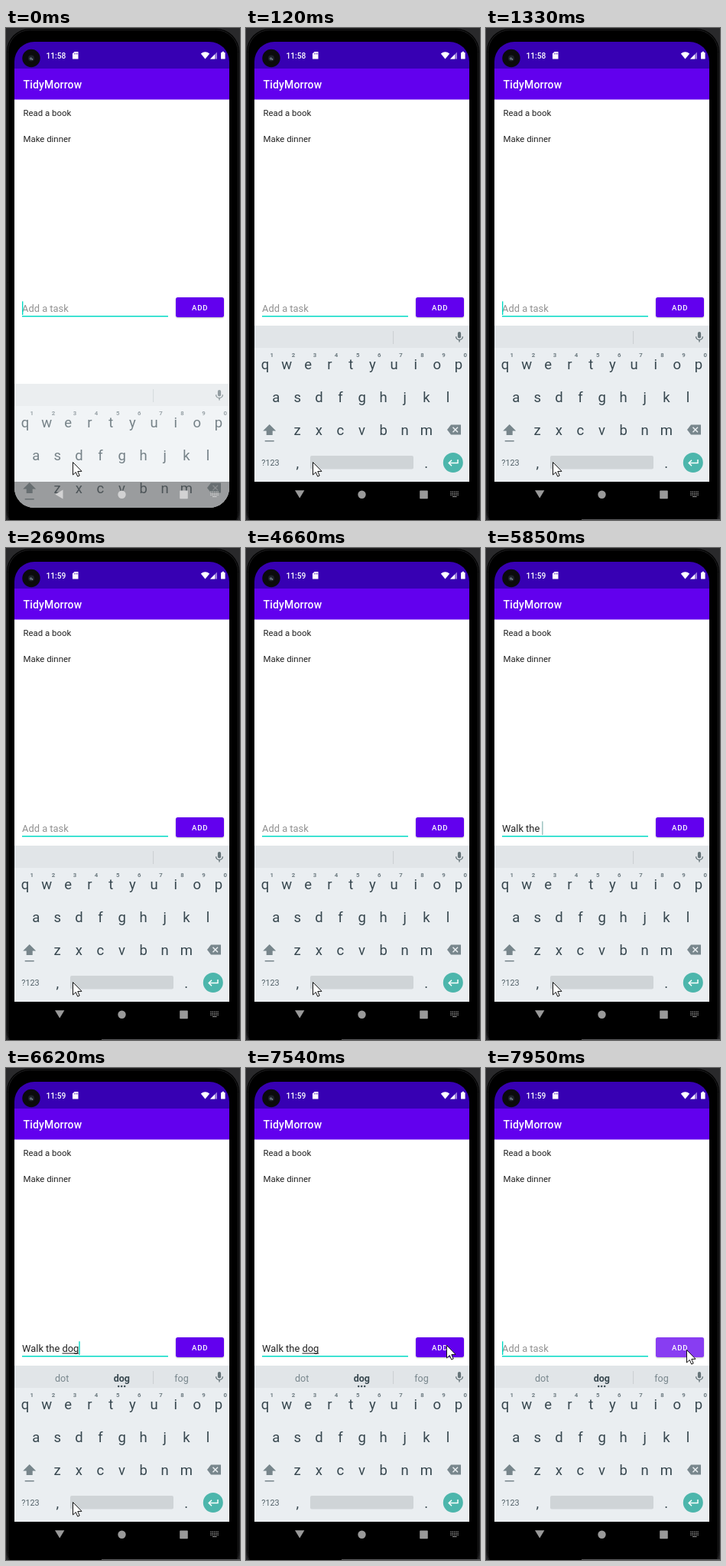
Animation of 306x643 px, one loop 8 s. Source, as an HTML page with a canvas:

```html
<!DOCTYPE html>
<html lang="en">
<head>
<meta charset="utf-8">
<title>Task list</title>
<style>
html, body { margin: 0; width: 100%; height: 100%; overflow: hidden; background: #000; }
canvas { display: block; width: 306px; height: 643px; }
</style>
</head>
<body>
<canvas id="stage"></canvas>
<script>
const W = 306, H = 643, LOOP = 8000;
const canvas = document.getElementById('stage');
const ctx = canvas.getContext('2d');
const ratio = window.devicePixelRatio || 1;
canvas.width = W * ratio;
canvas.height = H * ratio;

const PURPLE = '#6200ee', TEAL = '#03dac5', INK = '#37474f', SOFT = '#78868c';

// Each track is a list of [start, value]; the last started entry holds.
const caretTrack = [
  [0, 1], [120, 0], [400, 1], [650, 0], [1330, 1], [1640, 0], [2020, 1], [2690, 0],
  [3110, 1], [3610, 0], [4110, 1], [4660, 0], [4960, 1], [7180, 0], [7690, 1]
];
const textTrack = [
  [0, ''], [4960, 'W'], [5110, 'Wa'], [5230, 'Wal'], [5350, 'Walk'], [5470, 'Walk '],
  [5610, 'Walk t'], [5730, 'Walk th'], [5850, 'Walk the '], [6350, 'Walk the d'],
  [6500, 'Walk the do'], [6620, 'Walk the dog'], [7950, '']
];
const hintTrack = [
  [0, null], [5110, ['We', 'W', 'Was']], [5230, ['Was', 'Wa', 'Way']],
  [5350, ['Wall', 'Wal', 'Walls']], [5470, ['Wall', 'Walk', 'Walls']],
  [5730, ['to', 'th', 'the']], [5850, null], [6350, ['do', 'd', 'day']],
  [6500, ['dot', 'do', 'dog']], [6620, ['dot', 'dog', 'fog']]
];
const mouseTrack = [
  [0, [87, 567]], [7180, [98, 548]], [7300, [162, 454]], [7420, [236, 370]],
  [7540, [262, 362]], [7690, [262, 368]]
];

function at(track, t) {
  let value = track[0][1];
  for (const [start, v] of track) if (t >= start) value = v;
  return value;
}

function rect(x, y, w, h, color, r = 0) {
  ctx.fillStyle = color;
  ctx.beginPath();
  ctx.roundRect(x, y, w, h, r);
  ctx.fill();
}

function disc(x, y, r, color) {
  ctx.fillStyle = color;
  ctx.beginPath();
  ctx.arc(x, y, r, 0, 7);
  ctx.fill();
}

function path(color, points, width) {
  ctx.beginPath();
  for (let i = 0; i < points.length; i += 2) ctx.lineTo(points[i], points[i + 1]);
  if (width) {
    ctx.strokeStyle = color;
    ctx.lineWidth = width;
    ctx.stroke();
  } else {
    ctx.closePath();
    ctx.fillStyle = color;
    ctx.fill();
  }
}

function label(str, x, y, size, color, opt = {}) {
  ctx.font = `${opt.weight || 400} ${size}px Roboto, sans-serif`;
  ctx.letterSpacing = (opt.space || 0) + 'px';
  ctx.textAlign = opt.align || 'left';
  ctx.fillStyle = color;
  ctx.fillText(str, x, y);
  return ctx.measureText(str).width;
}

function phoneBody(t) {
  rect(0, 0, W, H, '#29292b');
  rect(1, 1, 304, 660, '#000', 30);
  ctx.strokeStyle = '#202022';
  ctx.lineWidth = 1;
  ctx.beginPath();
  ctx.roundRect(2.5, 2.5, 301, 660, 29);
  ctx.stroke();
  if (t >= 1330) rect(125, 642, 181, 1, '#5c5c5e');
}

function statusBar(t) {
  rect(11, 18, 281, 36, '#3700b3');
  disc(33, 39.5, 11.7, '#0b0b0d');
  disc(33, 39.5, 4, '#1d2229');
  disc(32.5, 40, 1.8, '#596570');
  disc(34.5, 41, 0.8, '#a0a9b1');
  label(t < 2140 ? '11:58' : '11:59', 52.5, 39.6, 10.2, '#fff', { weight: 500 });

  path('#fff', [89.5, 31, 94.5, 31, 94.5, 40.5, 87, 40.5, 87, 33.5]);
  for (const x of [89.2, 91, 92.8]) rect(x, 32.6, 0.7, 2, '#3700b3');

  ctx.fillStyle = '#fff';
  ctx.beginPath();
  ctx.moveTo(260.5, 40.5);
  ctx.lineTo(254.8, 33.5);
  ctx.quadraticCurveTo(260.5, 28.8, 266.2, 33.5);
  ctx.fill();
  path('#9b80d9', [267, 40.5, 276, 31.5, 276, 40.5]);
  path('#fff', [267, 40.5, 273, 34.5, 273, 40.5]);
  rect(281, 32, 5.6, 8.6, '#fff', 0.6);
  rect(282.6, 30.8, 2.4, 2, '#fff');
}

function button(t) {
  ctx.save();
  ctx.shadowColor = 'rgba(0,0,0,.25)';
  ctx.shadowBlur = 2 * ratio;
  ctx.shadowOffsetY = ratio;
  rect(222, 352, 63, 26, PURPLE, 2.7);
  ctx.restore();
  if (t >= 7690) {
    ctx.save();
    ctx.beginPath();
    ctx.roundRect(222, 352, 63, 26, 2.7);
    ctx.clip();
    disc(262, 367, t < 7810 ? 14 : t < 7950 ? 30 : 60, 'rgba(255,255,255,.24)');
    ctx.restore();
  }
  label('ADD', 242.9, 369, 9.6, '#fff', { weight: 500, space: 0.86 });
}

function field(t) {
  const text = at(textTrack, t);
  rect(21, 376, 191, 1.4, TEAL);
  let width = 0;
  if (text) {
    width = label(text, 21, 371, 12.9, '#212121');
    const composing = t >= 5110 && t < 5350 ? 0 : t >= 6350 ? 9 : -1;
    if (composing >= 0) {
      const from = ctx.measureText(text.slice(0, composing)).width;
      rect(21 + from, 372.6, width - from, 0.8, '#212121');
    }
  } else {
    label('Add a task', 21, 371, 12.9, '#919191');
  }
  if (at(caretTrack, t)) {
    const typing = text && t < 6620;
    rect(21 + width, 357.3, typing ? 0.9 : 1.4, 17.6, typing ? '#5d9c98' : TEAL);
  }
}

function mic(x, y) {
  const tone = '#667479';
  rect(x - 2.1, y - 7, 4.2, 8.6, tone, 2.1);
  ctx.strokeStyle = tone;
  ctx.lineWidth = 1.4;
  ctx.beginPath();
  ctx.arc(x, y - 0.8, 4.4, 0, Math.PI);
  ctx.stroke();
  rect(x - 0.7, y + 3.4, 1.4, 3.2, tone);
}

function letterRow(letters, x, y) {
  [...letters].forEach((c, i) =>
    label(c, x + i * 28.1, y, 18.5, INK, { align: 'center' }));
}

function keyboard(t) {
  rect(11, 389, 281, 29, '#e1e5e8');
  rect(11, 418, 281, 176, '#eaeef1');
  rect(192.2, 396, 0.9, 17, '#c6cbce');
  mic(279, 404);

  const hints = at(hintTrack, t);
  if (hints) {
    hints.forEach((word, i) => {
      const strong = i === 1;
      const bold = strong && ['Walk', 'dog'].includes(word);
      label(word, 73.2 + i * 78.1, 409.6, 12.5, strong ? INK : SOFT,
        { align: 'center', weight: bold ? 700 : 400 });
    });
    for (let i = -1; i < 2; i++) disc(151.2 + i * 4, 416, 1.2, INK);
  }

  for (let i = 0; i < 10; i++) {
    label(String((i + 1) % 10), 33.8 + i * 28.1, 430.3, 7.8, '#6c7a80',
      { align: 'center', weight: 700 });
  }
  letterRow('qwertyuiop', 25, 446);
  letterRow('asdfghjkl', 39.2, 488.8);
  letterRow('zxcvbnm', 67.2, 531.8);

  path(SOFT, [30.7, 518, 39.2, 526.5, 34.7, 526.5, 34.7, 532, 26.7, 532, 26.7, 526.5, 22.2, 526.5]);
  rect(24.7, 539, 12, 1.5, SOFT);

  path(SOFT, [263, 525, 268, 518.5, 281, 518.5, 281, 531.5, 268, 531.5]);
  path('#eaeef1', [270.5, 521.7, 277, 528.2], 1.5);
  path('#eaeef1', [277, 521.7, 270.5, 528.2], 1.5);

  label('?123', 32, 572, 10.8, '#526168', { align: 'center' });
  label(',', 67.2, 574.5, 18.5, INK, { align: 'center' });
  label('.', 235.8, 574.5, 18.5, INK, { align: 'center' });
  rect(84, 559, 135, 17.5, '#cfd4d7', 2);
  disc(270.8, 568, 13, '#4db6ac');
  path('#fff', [277, 564, 277, 568.5, 265.5, 568.5], 1.5);
  path('#fff', [269, 564.7, 265.2, 568.5, 269, 572.3], 1.5);
}

function navBar(sliding) {
  rect(11, 593, 281, 34, sliding ? 'rgba(0,0,0,.36)' : '#000');
  const tone = sliding ? '#d2d2d3' : '#999';
  if (sliding) path(tone, [64.5, 609.5, 74.5, 603.5, 74.5, 615.5]);
  else path(tone, [64, 604.3, 76.4, 604.3, 70.2, 614.5]);
  disc(151.5, 609.7, 5.2, tone);
  rect(227.2, 604.6, 10.6, 10.6, tone, 0.8);
  for (let row = 0; row < 3; row++)
    for (let i = 0; i < 5; i++) rect(267.3 + i * 2.3, 605.6 + row * 2.1, 1.3, 1.2, tone);
  rect(270, 611.9, 5.6, 1.1, tone);
}

function pointer(x, y) {
  ctx.save();
  ctx.translate(x + 0.5, y + 0.5);
  ctx.beginPath();
  const p = [0, 0, 0, 16.5, 3.8, 13, 6.2, 18.6, 8.7, 17.5, 6.3, 12, 11.5, 11.8];
  for (let i = 0; i < p.length; i += 2) ctx.lineTo(p[i], p[i + 1]);
  ctx.closePath();
  ctx.fillStyle = '#fff';
  ctx.fill();
  ctx.strokeStyle = '#111';
  ctx.lineWidth = 1;
  ctx.stroke();
  ctx.restore();
}

function draw(t) {
  const sliding = t < 120;
  ctx.setTransform(ratio, 0, 0, ratio, 0, 0);
  phoneBody(t);

  ctx.save();
  ctx.beginPath();
  ctx.roundRect(11, 18, 281, 609, 26);
  ctx.clip();
  rect(11, 54, 281, sliding ? 573 : 539, '#fff');
  statusBar(t);
  rect(11, 53, 281, 40.5, PURPLE);
  label('TidyMorrow', 22.5, 79, 14, '#fff', { weight: 500, space: 0.17 });
  label('Read a book', 22.5, 115, 11.4, '#212121');
  label('Make dinner', 22.5, 149.2, 11.4, '#212121');
  field(t);
  button(t);

  ctx.save();
  if (sliding) {
    ctx.translate(0, 76);
    ctx.globalAlpha = 0.66;
  }
  keyboard(t);
  ctx.restore();
  navBar(sliding);
  ctx.restore();

  pointer(...at(mouseTrack, t));
}

const begin = performance.now();
function tick() {
  draw((performance.now() - begin) % LOOP);
  requestAnimationFrame(tick);
}
tick();
</script>
</body>
</html>
```
